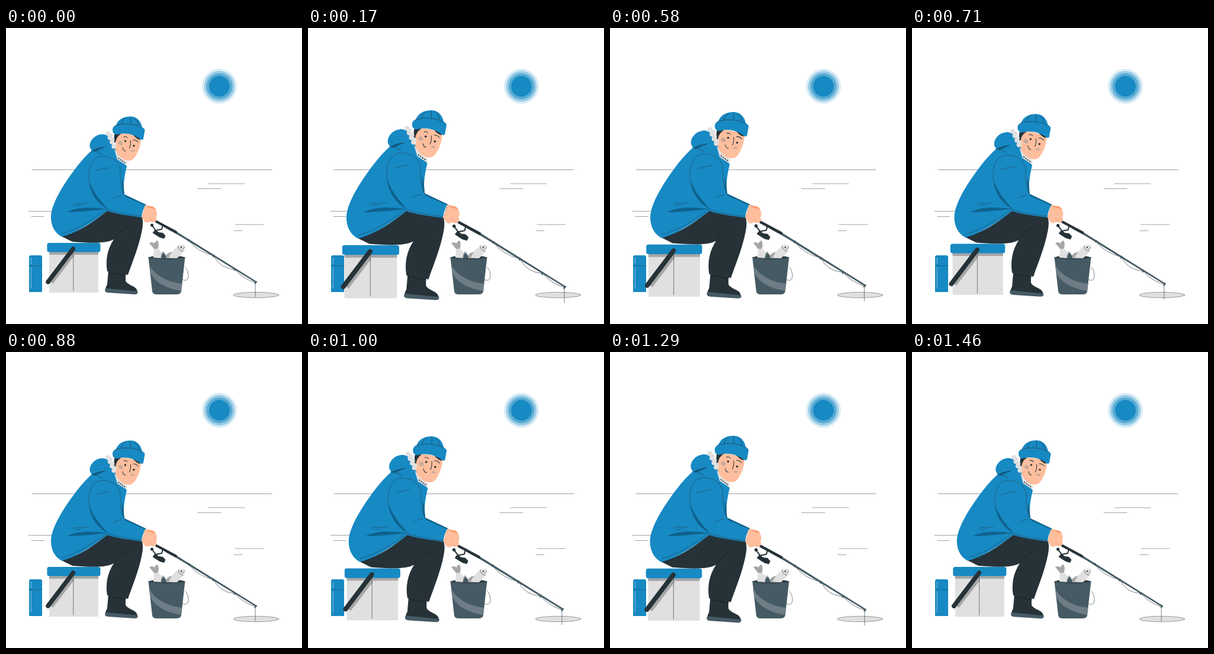
Animation, 500 px wide and 500 px high, one loop 1.5 s. Source, as an HTML page:

```html
<!DOCTYPE html>
<html lang="en">
<head>
<meta charset="utf-8">
<title>Ice fishing</title>
<style>
  html, body { margin: 0; width: 100%; height: 100%; overflow: hidden; background: #fff; }
  svg { display: block; width: 100vw; height: 100vh; }
  .blue { fill: #1789c3; }
  .deep { fill: #0e628d; }
  .dark { fill: #263238; }
  .slate { fill: #455a64; }
  .pale { fill: #e0e0e0; }
  .mid { fill: #a6a6a6; }
  .skin { fill: #ffbe9d; }
  .line { fill: none; stroke: #263238; stroke-width: .6; stroke-linecap: round; stroke-linejoin: round; }
  .faint { stroke-opacity: .75; }
</style>
</head>
<body>
<svg viewBox="0 0 500 500">
  <g class="blue">
    <circle cx="360.5" cy="98.5" r="28.8" fill-opacity=".12" stroke="#1789c3" stroke-width=".5" stroke-opacity=".4"/>
    <circle cx="360.5" cy="98.5" r="26" fill-opacity=".35"/>
    <circle cx="360.5" cy="98.5" r="22" fill-opacity=".5"/>
    <circle cx="360.5" cy="98.5" r="17.4"/>
  </g>
  <path class="line faint" d="M44 239.5H449M342 263H403M324 271.5H363M387 332H435M385 342.5H399M38 309.5H78M43 318.5H64"/>

  <ellipse class="pale" cx="422.5" cy="451" rx="38.3" ry="4.7"/>
  <ellipse class="line faint" cx="422.5" cy="451" rx="38.3" ry="4.7"/>

  <g id="thermos">
    <path class="blue" d="M39 446V387Q39 384 42 384H58Q61 384 61 387V446Z"/>
    <path class="line faint" d="M39 401.5H61M39 429H42"/>
    <path d="M42.3 388V399M42.3 404V440" stroke="#8bc4e1"/>
  </g>

  <g id="angler">
    <g id="box">
      <path class="pale" d="M73 377H156V447H73Z"/>
      <path class="mid" d="M73 377H156V383H73Z"/>
      <path d="M77 430L113 383" stroke="#a6a6a6" stroke-width="6"/>
      <path class="line" d="M113.8 378V444"/>
      <rect class="blue" x="69.5" y="363" width="90" height="15.5" rx="3.5"/>
      <path d="M71 429L113.5 373" stroke="#263238" stroke-width="7.5" stroke-linecap="round"/>
    </g>

    <g id="legs">
      <path class="dark" d="M173 409L171 433Q168 438 168 442L222 448Q223 440 214 436Q203 431 202 427V413Z"/>
      <path class="slate" d="M168 439.5L222.5 445Q224 450 217 450L172 447Q165 446 168 439.5Z"/>
      <path class="dark" d="M92 351C125 346 150 325 172 308L229 318C232 324 231.500 334 229.500 343C224 371 212 399 206 417L171 411C168 392 171 374 182 357C168 365 140 363 112 361Z"/>
      <path class="line" style="stroke:#10181c" d="M181 357C188 348 196 339 207 336M173 413L203 418"/>
    </g>

    <g id="jacket">
      <path class="blue" d="M147 205C128 221 111 245 98 265C84 287 76 306 76 319C76 334 82 346 94 352.500C118 347 147 328 171 309C188 315 210 317 229 320Q230 308 236 299L200 282C197 265 201 246 204 234L181 204Z"/>
      <path class="deep" d="M196 254C195 267 197 280 202 285L236 300L237 298.500L200 281C199 271 199 261 196 254Z"/>
      <path class="deep" d="M140 257C142 280 156 298 172 306C156 288 147 277 140 257Z"/>
      <path class="deep" d="M103 311C120 302 145 302 171 306C147 308 123 311 103 311Z"/>
      <path class="line faint" d="M140 257C138 235 146 217 163 217C180 217 192 226 193 242C193 260 195 275 200 282M152 241Q164 237 175 236M181 288Q188 283 195 283M113 299Q115 295 124 297L138 296M117 300H126M95 347C120 341 146 324 171 306C188 313 208 315 229 318"/>
      <path class="blue" d="M174 211C166 205 155 210 148 208C136 203 142 186 155 181C166 177 173 181 177 189L196 222L204 234L184 223Z"/>
      <path class="deep" d="M143 207Q156 202 170 200Q158 205 151 209Z"/>
      <path class="line" d="M148 208Q158 201 166 202M153 208L162 213"/>
    </g>

    <g id="head">
      <path class="pale" d="M183 205L205 227L203 232L188 222Z"/>
      <path class="line" stroke-dasharray="1 3" style="stroke-width:1.6" d="M190 220L201 228"/>
      <path class="skin" d="M184 181C193 176 215 178 228 189C227 201 222 212 217 219C211 227 201 225 193 218C184 209 181 197 184 181Z"/>
      <path class="dark" d="M183 180Q187 176 194 179Q186 184 185 194L182 192ZM214 180L227 186L226 189Q220 187 214 180Z"/>
      <g id="fur" class="pale"></g>
      <g fill="#b5a49b" fill-opacity=".75">
        <ellipse cx="194" cy="194.5" rx="4" ry="3.3" transform="rotate(35 194 194)"/>
        <ellipse cx="213.5" cy="207.5" rx="3.6" ry="1.8"/>
      </g>
      <g class="dark"><circle cx="201.5" cy="191" r="1.7"/><circle cx="216" cy="199" r="1.7"/></g>
      <path class="line" style="stroke-width:1" d="M199 184Q202 182 205 185.500M215 189Q221 189 223 193M210.500 190Q211 198 208.500 203M197 202Q198 208 202 208"/>
      <path class="blue" d="M185 168C187 155 198 149.5 211 149.5C223 150 229 160 230 169Z"/>
      <path class="blue" d="M180 172C180 164 188 163 202 162.5C218 163 235 167 234.5 173L232 187Q230 191 226 187C215 179 200 176 188 180Q180 180 180 172Z"/>
      <path class="line" d="M184 165C198 160 218 161 231 169M195 162Q196 155 202 152M210.500 161V151M224 164Q222 156 217 152"/>
    </g>

    <g id="rod">
      <path class="line" d="M270 338L309 359Q322 377 351 385Q361 406 387 408Q399 423 421 430V454"/>
      <path class="slate" d="M285 342L423.800 428.500L422.500 430.500L284 345.300Z"/>
      <path d="M254 327L287 344.700" stroke="#263238" stroke-width="4.2" stroke-linecap="round"/>
      <path d="M310 357L308 360.500M351.500 383L349.500 387M387.500 406L385.500 410M423.500 428L420 432" stroke="#455a64" stroke-width="2.2"/>
      <g class="dark">
        <circle cx="246.500" cy="333" r="2.6"/>
        <path d="M247.500 346L252 340.500L258 345L265 346L269.500 351L267 356L260 354L255 351Z"/>
      </g>
      <path class="line" style="stroke-width:2" d="M247 334L253 342L263 340L265 333"/>
    </g>
    <g id="hand">
      <path class="skin" d="M235 299L246 301Q252 303 253 306L255 312Q255 317 253.500 319Q257 326 250 328L243 327Q239 331 234 327L229 319Z"/>
      <path fill="#ff9a6c" d="M236 300L248 302Q252 304 252 306L246 305Z"/>
      <path class="line" style="stroke:#e98c66" d="M243 321L248 328"/>
    </g>
  </g>

  <g id="bucket">
    <path class="line" d="M303 404Q309 411 308 421Q306 429 298 425"/>
    <ellipse class="dark" cx="271.5" cy="388" rx="31" ry="3.5"/>
    <path class="pale" d="M249 388L250 373L242 363Q248 361 251 364Q252 360 256 359Q260 365 257 373Q264 378 265 389Z"/>
    <path class="mid" d="M242 363Q248 361 251 364Q252 360 256 359Q259 366 256 373L250 373Z"/>
    <path class="mid" d="M261 389Q262 380 265 377Q269 380 270 384Q275 378 282 378L288 389Z"/>
    <path class="slate" d="M262 389Q263 381 266 380Q270 383 271 389Z"/>
    <path class="pale" d="M275 388Q279 378 287 371Q295 364 302 367Q304 375 296 382L289 389Z"/>
    <path class="line" d="M291 368Q291 376 299 377M298 374L302 370"/>
    <circle class="dark" cx="296" cy="370.5" r="1.2"/>
    <path class="slate" d="M240.500 387Q271 392 302.500 387L296 445Q295 450 288 450H254Q248 450 247 445Z"/>
    <path fill="#6e7d85" d="M242 400C251 417 271 429 297.500 432L296 444C270 440 251 429 244 414Z"/>
    <path class="line" d="M241 388Q271 393 302 388"/>
  </g>
</svg>
<script>
  const LOOP = 1500;
  const PIVOT = [242, 307];
  // [time in ms, pulse strength]
  const KEYS = [[0, 0], [255, 1], [880, 0], [1140, .95], [1465, 0], [LOOP, 0]];

  const angler = document.getElementById('angler');
  document.getElementById('fur').innerHTML = Array.from({ length: 7 }, (_, i) => {
    const x = 172 + i * 1.7 + (i % 2) * 2.5;
    return `<circle cx="${x}" cy="${178 + i * 3.7}" r="3.8"/>`;
  }).join('');

  function pulse(t) {
    const i = KEYS.findIndex(key => key[0] > t);
    const [t0, a] = KEYS[i - 1], [t1, b] = KEYS[i];
    return a + (b - a) * (t - t0) / (t1 - t0);
  }

  function draw() {
    const scale = 1 + .1 * pulse(performance.now() % LOOP);
    const [x, y] = PIVOT;
    angler.setAttribute('transform', `translate(${x} ${y}) scale(${scale}) translate(${-x} ${-y})`);
    requestAnimationFrame(draw);
  }
  draw();
</script>
</body>
</html>
```
